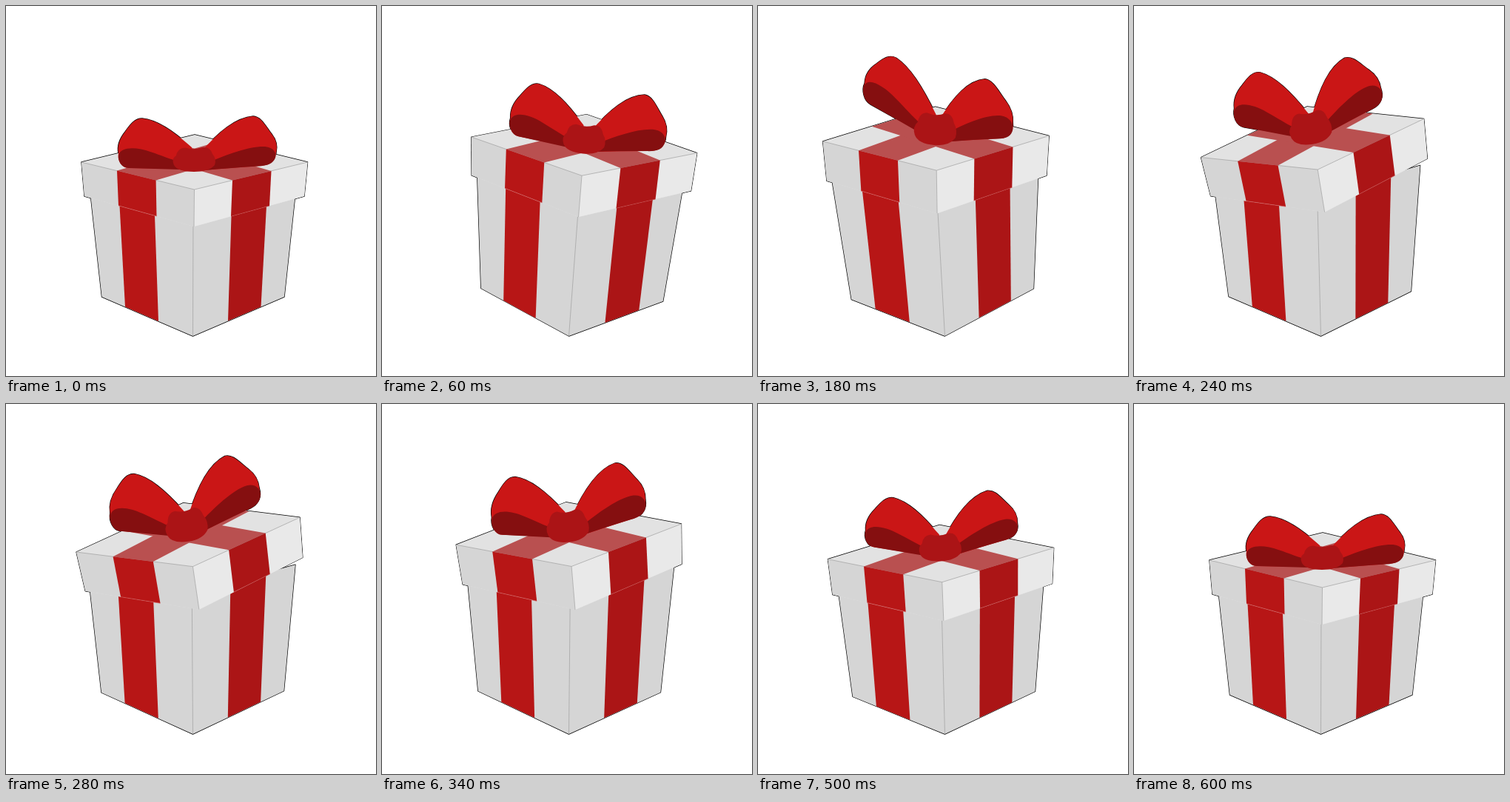
Write an HTML page with a canvas that moves like this. It is 500 px wide and 500 px high and loops after 1.2 s.

```html
<!DOCTYPE html>
<html>
<head>
<meta charset="utf-8">
<style>
html, body { margin: 0; height: 100%; overflow: hidden; background: #fff; }
canvas { display: block; }
</style>
</head>
<body>
<canvas id="stage" width="500" height="500"></canvas>
<script>
const ctx = document.getElementById('stage').getContext('2d');
const LOOP = 1200, STEP = 20;
const FOOT = [252.5, 446], HINGE = [254.25, 248];
const RED = '#b71616', DEEP = '#ab1516', PALE = '#b95050', GREY = '#a0a0a0';

// pull: upward stretch, lean: whole box, tilt: lid on the box,
// flap: loops lifted, sway: bow tipped sideways (angles in degrees)
const rest = { pull: 0, lean: 0, tilt: 0, flap: 0, sway: 0 };
const keys = [
  { at: 0, ...rest },
  { at: 100, pull: .168, lean: 5.9, tilt: .2, flap: 6, sway: 6.5 },
  { at: 180, pull: .132, lean: -3.4, tilt: 2, flap: 12, sway: 15 },
  { at: 240, pull: .136, lean: -1.6, tilt: -8.2, flap: 14, sway: 2.5 },
  { at: 340, pull: .144, lean: .4, tilt: -5.7, flap: 6, sway: -.5 },
  { at: 440, pull: .073, lean: -2.3, tilt: -2.6, flap: 15, sway: 1 },
  { at: 600, ...rest }
];

const box = 'M112,235L253,270L393,235L376,393L252.5,446L129.5,393Z';
const lid = 'M102,211L255,174L407.5,211L403,257L254,298L106,257Z';
const loops = [
  {
    turn: 1, pivot: [254, 207],
    outer: 'M251,191C225,168 204,154 184,152C174,152 168,160 161,170C153,180 150,190 152,199C150,208 156,219 166,219L232,220L254,207Z',
    inner: 'M152,202C155,189 178,191 195,197C210,202 222,207 236,211L236,221L166,219C156,219 151,209 152,202Z'
  },
  {
    turn: -1, pivot: [254, 218],
    outer: 'M262,199C288,169 311,151 334,149C345,150 350,161 359,173C366,182 367,190 365,198C365,208 358,215 345,216Q300,219 268,222L254,207Z',
    inner: 'M272,212C300,200 330,189 350,190C362,191 366,199 364,205C361,213 354,216 340,216.5Q300,219 268,222Z'
  }
];
const knot = 'M-12,-15.5Q0,-12 12,-16Q22,-17 25,-7Q31,0 28,8Q20,17 0,17Q-22,17 -27,8Q-31,0 -24,-5Q-22,-15 -12,-15.5Z';

// Smooth curve through the keys, at rest at both ends
function poseAt(t) {
  const last = keys.length - 1;
  if (t >= keys[last].at) return rest;
  const i = keys.findIndex((key, n) => t < keys[n + 1].at);
  const a = keys[i], b = keys[i + 1], span = b.at - a.at, u = (t - a.at) / span;
  const slope = (k, name) => k === 0 || k === last ? 0 :
    (keys[k + 1][name] - keys[k - 1][name]) / (keys[k + 1].at - keys[k - 1].at);
  const pose = {};
  for (const name in rest) {
    pose[name] = a[name] + (b[name] - a[name]) * u * u * (3 - 2 * u)
      + span * u * (1 - u) * ((1 - u) * slope(i, name) - u * slope(i + 1, name));
  }
  return pose;
}

function place(d, m) {
  const path = new Path2D();
  path.addPath(new Path2D(d), m);
  return path;
}
function fill(d, m, color) {
  ctx.fillStyle = color;
  ctx.fill(place(d, m));
}
function line(d, m, color, width = .7) {
  ctx.strokeStyle = color;
  ctx.lineWidth = width;
  ctx.stroke(place(d, m));
}

function draw(t) {
  const { pull, lean, tilt, flap, sway } = poseAt(t);
  const base = new DOMMatrix().translate(...FOOT).rotate(lean);
  const boxM = base.scale(1, 1 + .55 * pull).translate(-FOOT[0], -FOOT[1]);
  const lidM = base
    .translate(HINGE[0] - FOOT[0], (HINGE[1] - FOOT[1]) * (1 + pull))
    .rotate(tilt).scale(1, 1 + 1.22 * pull).translate(-HINGE[0], -HINGE[1]);
  const rise = .35 * flap + 27 * pull;
  const bowM = lidM.translate(254, 207 - rise).rotate(sway / 3).skewY(sway * 2 / 3);
  const loopM = loops.map(({ turn, pivot: [x, y] }) => bowM
    .translate(x - 254, y - 207).rotate(turn * flap).translate(-x, -y));

  ctx.clearRect(0, 0, 500, 500);
  ctx.lineJoin = 'round';

  // dark rim, left visible only around the silhouette
  line(box, boxM, '#000', 1.4);
  line(lid, lidM, '#000', 1.4);
  loops.forEach((loop, i) => line(loop.outer, loopM[i], '#000', 1.4));

  // box
  fill(box, boxM, '#d5d5d5');
  line('M252.5,446L253,270', boxM, GREY);
  fill('M152,242.6L200,254.4L206,426L161,406.6Z', boxM, RED);
  fill('M305.4,255.6L353.5,242.8L344.5,406.5L300,425.6Z', boxM, DEEP);

  // lid
  fill(lid, lidM, '#e2e2e2');
  fill('M102,211L254.5,248L254,298L106,257Z', lidM, '#d5d5d5');
  fill('M254.5,248L407.5,211L403,257L254,298Z', lidM, '#e9e9e9');
  line('M102,211L254.5,248L407.5,211M254.5,248L254,298', lidM, GREY);
  fill('M150,222.6L202.6,235.4L341,195L290,182.5Z', lidM, PALE);
  fill('M306,235.5L358.5,222.9L220,182.5L168.5,195Z', lidM, PALE);
  fill('M150,222.6L202.6,235.4L203.5,284L152,269.8Z', lidM, RED);
  fill('M306,235.5L358.5,222.9L356,270L304,284.2Z', lidM, DEEP);
  line('M152,269.8L203.5,284', lidM, '#d05a5a');
  line('M304,284.2L356,270', lidM, '#c04040');

  // bow
  loops.forEach((loop, i) => {
    fill(loop.outer, loopM[i], '#ca1616');
    fill(loop.inner, loopM[i], '#850f10');
  });
  const knotM = lidM.translate(254, 207 - rise).rotate(sway / 3).scale(1, 1 + .018 * rise);
  fill(knot, knotM, '#ab1416');
}

const start = performance.now();
function frame() {
  const t = (performance.now() - start) % LOOP;
  draw(Math.floor(t / STEP) * STEP);
  requestAnimationFrame(frame);
}
frame();
</script>
</body>
</html>
```
